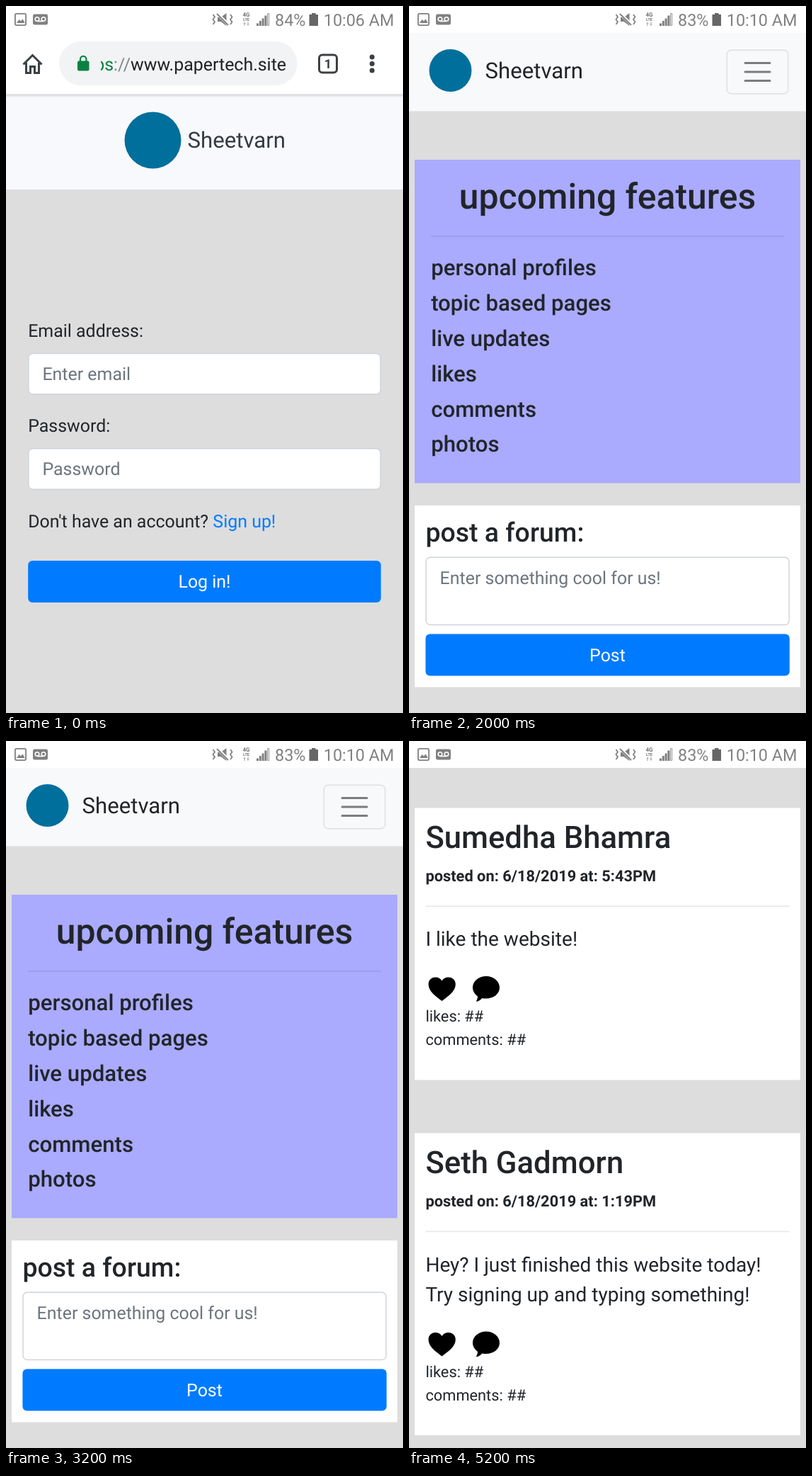
Animation of 561 by 998 pixels, one loop 6000 ms. Source, as an HTML page:

```html
<!DOCTYPE html>
<html lang="en">
<head>
<meta charset="utf-8">
<title>Forum app tour</title>
<style>
  html, body { margin: 0; height: 100%; overflow: hidden; background: #ddd; }
  svg.stage { display: block; width: 100vw; height: 100vh; }
  text { font-family: Roboto, sans-serif; font-size: 24.93px; fill: #212529; text-rendering: geometricPrecision; }

  .screen { animation: show 6s step-end infinite; }
  .second { animation-delay: -4s; }
  .third { animation-delay: -2s; }
  @keyframes show {
    0% { visibility: visible; }
    33.3333% { visibility: hidden; }
    100% { visibility: hidden; }
  }

  .mid { text-anchor: middle; }
  .end { text-anchor: end; }
  .status { font-size: 23.4px; fill: #808080; }
  .brand { font-size: 31.17px; }
  .h1 { font-size: 49.87px; font-weight: 500; }
  .h2 { font-size: 43.63px; font-weight: 500; }
  .h4 { font-size: 37.4px; font-weight: 500; }
  .h5 { font-size: 31.17px; font-weight: 500; }
  .lead { font-size: 28.05px; }
  .small { font-size: 21.82px; }
  .bold { font-weight: 700; }
  .hint { fill: #6c757d; }
  .link { fill: #007bff; }
  .label { fill: #fff; }
  .white { fill: #fff; }
  .logo { fill: #006f9c; }
  .button { fill: #007bff; }
  .field { fill: #fff; stroke: #ced4da; stroke-width: 1.4; }
  .rule { stroke: #000; stroke-opacity: .1; stroke-width: 1.5; }
  .line { fill: none; stroke: #3c4043; stroke-width: 3; }
  .thin { fill: none; stroke: #808080; stroke-width: 1.8; }
</style>
</head>
<body>
<svg class="stage" viewBox="0 0 561 998">
  <defs>
    <linearGradient id="shade" x2="0" y2="1">
      <stop offset="0" stop-color="#d3d5d8"/>
      <stop offset="1" stop-color="#f8f9fc"/>
    </linearGradient>
    <clipPath id="urlBox"><rect x="134" y="60" width="270" height="44"/></clipPath>

    <g id="statusBar">
      <rect class="white" width="561" height="38"/>
      <rect class="thin" x="12.9" y="10.9" width="15.2" height="16.2" rx="2"/>
      <path d="M15 24l3.6-5 2.4 2.6 2.4-3.4 3.4 5.8z" fill="#808080"/>
      <rect x="38" y="11.5" width="21" height="15" rx="2.5" fill="#808080"/>
      <g fill="none" stroke="#fff" stroke-width="1.6">
        <circle cx="44" cy="18.5" r="2.8"/>
        <circle cx="53" cy="18.5" r="2.8"/>
        <path d="M44 21.5h9"/>
      </g>
      <path d="M299 16h4.5l8-6v18l-8-6H299z" fill="#808080"/>
      <path d="M298 10l17 17" stroke="#fff" stroke-width="4"/>
      <path class="thin" d="M298 11l16 16"/>
      <path class="thin" stroke-width="1.5" d="M292.5 12l2.5 3.5-2.5 3.5 2.5 3.5-2.5 3.5M317 12l2.5 3.5-2.5 3.5 2.5 3.5-2.5 3.5"/>
      <g font-weight="700">
        <text class="mid" x="339.5" y="15" style="font-size:8px;fill:#707070">4G</text>
        <text class="mid" x="339.5" y="21" style="font-size:5.5px;fill:#707070">LTE</text>
      </g>
      <path d="M335 25l2-2.5 2 2.5zm1.3 0h1.4v3h-1.4zM340 25.5l2 2.5 2-2.5zm1.3-3h1.4v3h-1.4z" fill="#b5b5b5"/>
      <path d="M354 24.5h3V28h-3zm3.8-3.5h3v7h-3zm3.8-3.5h3V28h-3zm3.8-4h3V28h-3z" fill="#808080"/>
      <path d="M369.5 10.6h2.2v16.8h-2.2z" fill="#eee" stroke="#999"/>
      <path d="M432 10h5.5v2h3.5v16h-12.500V12h3.500z" fill="#666"/>
    </g>

    <g id="reactions">
      <path d="M46.500 367C39 361 27.500 354 27.500 343.500C27.500 332 42 330.500 46.500 338.500C51 330.500 65.800 332 65.800 343.500C65.800 354 54 361 46.500 367z"/>
      <path d="M109 332c10.500 0 19 7 19 16s-8.500 15.500-19 15.500c-2 0-4-.2-5.500-.6c-3 3-5.500 4.600-8.800 4.900c1.500-2.200 2.300-4.600 2.300-7.300C93 357.500 90 353 90 348c0-9 8.500-16 19-16z"/>
      <text class="small" x="23.4" y="396.300">likes: ##</text>
      <text class="small" x="23.4" y="429">comments: ##</text>
    </g>
  </defs>

  <rect width="561" height="998" fill="#ddd"/>
  <use href="#statusBar"/>
  <text class="status" x="449" y="27.500">10:</text>

  <g class="screen first">
    <use href="#statusBar"/>
    <text class="status" x="380" y="27.500">84%</text>
    <text class="status end" x="548.500" y="27.500">10:06 AM</text>

    <rect class="white" y="38" width="561" height="87"/>
    <path class="line" d="M24.500 82.500L37.500 69.500L50.500 82.500M28.500 80V94.500H34.500V85.500H40.500V94.500H46.500V80"/>
    <rect x="75" y="50" width="336.500" height="62" rx="31" fill="#f1f3f4"/>
    <rect x="101" y="77.500" width="16.500" height="14" rx="2" fill="#0b8043"/>
    <path d="M105 78v-3a4.200 4.200 0 0 1 8.400 0v3" fill="none" stroke="#0b8043" stroke-width="2.200"/>
    <g clip-path="url(#urlBox)">
      <text class="end" x="396" y="90.500" style="fill:#202124"><tspan fill="#0b8043">https</tspan><tspan fill="#80868b">://</tspan>www.papertech.site</text>
    </g>
    <rect class="line" x="442.500" y="69" width="25" height="25" rx="4.500"/>
    <text class="mid bold" x="455" y="88" style="font-size:18px;fill:#3c4043">1</text>
    <g fill="#3c4043">
      <circle cx="517.300" cy="72" r="3.500"/>
      <circle cx="517.300" cy="81.500" r="3.500"/>
      <circle cx="517.300" cy="91" r="3.500"/>
    </g>

    <rect y="125" width="561" height="134" fill="#f8f9fc"/>
    <rect y="124.500" width="561" height="5" fill="url(#shade)"/>
    <circle class="logo" cx="207.500" cy="189.500" r="40"/>
    <text class="brand" x="256.500" y="200" style="fill:#343a40">Sheetvarn</text>

    <text x="31.200" y="467">Email address:</text>
    <rect class="field" x="31.900" y="490.500" width="497.200" height="57.500" rx="6"/>
    <text class="hint" x="51.400" y="528">Enter email</text>
    <text x="31.200" y="601">Password:</text>
    <rect class="field" x="31.900" y="624.700" width="497.200" height="57.500" rx="6"/>
    <text class="hint" x="51.400" y="662">Password</text>
    <text x="31.200" y="735.500">Don't have an account? <tspan class="link">Sign up!</tspan></text>
    <rect class="button" x="31.200" y="783" width="498.600" height="59" rx="6.200"/>
    <text class="label mid" x="280.500" y="821">Log in!</text>
  </g>

  <g class="screen second">
    <use href="#statusBar"/>
    <text class="status" x="380" y="27.500">83%</text>
    <text class="status end" x="548.500" y="27.500">10:10 AM</text>

    <rect y="38" width="561" height="110.500" fill="#f8f9fa"/>
    <circle class="logo" cx="58.500" cy="91" r="30"/>
    <text class="brand" x="107.500" y="101.500">Sheetvarn</text>
    <rect x="449.300" y="62.300" width="86.400" height="61.400" rx="6" fill="none" stroke="#000" stroke-opacity=".1" stroke-width="1.500"/>
    <path d="M475 80.500h35M475 93h35M475 105.500h35" stroke="#7c7c7d" stroke-width="3" stroke-linecap="round"/>

    <rect x="8" y="217" width="545" height="456.500" fill="#aaf"/>
    <text class="h1 mid" x="280.500" y="286">upcoming features</text>
    <path class="rule" d="M31 325h499"/>
    <text class="h5" x="31.200" y="380">personal profiles</text>
    <text class="h5" x="31.200" y="429.900">topic based pages</text>
    <text class="h5" x="31.200" y="479.700">live updates</text>
    <text class="h5" x="31.200" y="529.600">likes</text>
    <text class="h5" x="31.200" y="579.500">comments</text>
    <text class="h5" x="31.200" y="629.400">photos</text>

    <rect class="white" x="8" y="705" width="545" height="256.500"/>
    <text class="h4" x="23.400" y="755.500">post a forum:</text>
    <rect class="field" x="24.100" y="778.300" width="513" height="95.200" rx="6"/>
    <text class="hint" x="43.600" y="816">Enter something cool for us!</text>
    <rect class="button" x="23.400" y="886.500" width="514.400" height="59" rx="6.200"/>
    <text class="label mid" x="280.500" y="924.500">Post</text>
  </g>

  <g class="screen third">
    <use href="#statusBar"/>
    <text class="status" x="380" y="27.500">83%</text>
    <text class="status end" x="548.500" y="27.500">10:10 AM</text>

    <rect class="white" x="8" y="94.500" width="545" height="384"/>
    <text class="h2" x="23.400" y="151">Sumedha Bhamra</text>
    <text class="small bold" x="23.400" y="198">posted on: 6/18/2019 at: 5:43PM</text>
    <path class="rule" d="M23.400 233.300h514.400"/>
    <text class="lead" x="23.400" y="289">I like the website!</text>
    <use href="#reactions"/>

    <rect class="white" x="8" y="553.500" width="545" height="426.500"/>
    <text class="h2" x="23.400" y="610">Seth Gadmorn</text>
    <text class="small bold" x="23.400" y="657.300">posted on: 6/18/2019 at: 1:19PM</text>
    <path class="rule" d="M23.400 692.500h514.400"/>
    <text class="lead" x="23.400" y="748.500">Hey? I just finished this website today!</text>
    <text class="lead" x="23.400" y="790.500">Try signing up and typing something!</text>
    <use href="#reactions" y="501.500"/>
  </g>
</svg>
</body>
</html>
```
